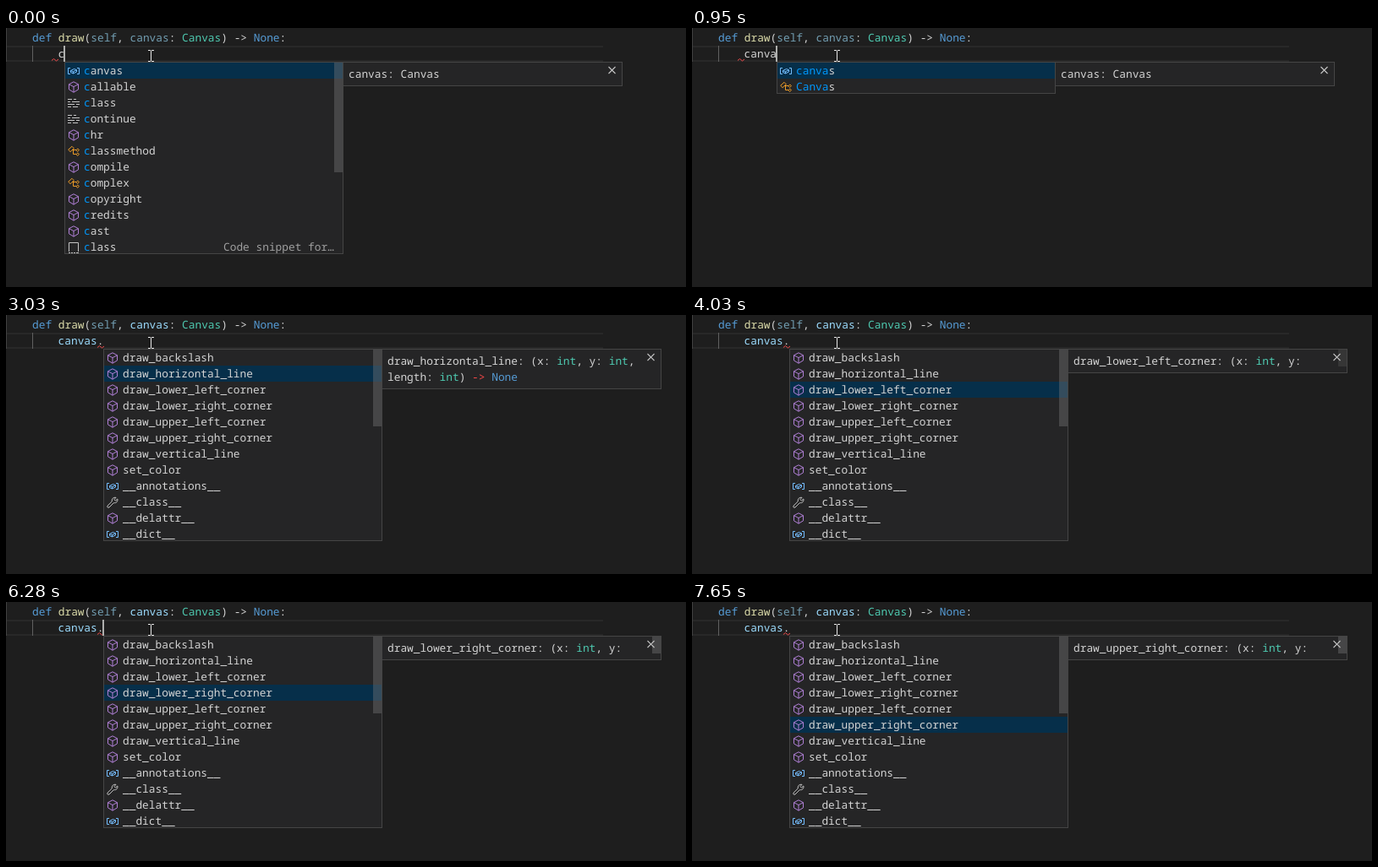
An HTML page for the animation above (8000 ms loop, 804 by 307 pixels).

```html
<!DOCTYPE html>
<html lang="en">
<head>
<meta charset="utf-8">
<title>Code completion</title>
<style>
  html, body { margin: 0; width: 100%; height: 100%; overflow: hidden; background: #1e1e1e; }
  svg { display: block; }
  text { font: 12.83px "Noto Sans Mono", monospace; fill: #d4d4d4; white-space: pre; text-rendering: geometricPrecision; }
</style>
</head>
<body>
<svg id="stage" width="804" height="307" viewBox="0 0 804 307"></svg>
<script>
const LOOP = 8000, CHAR = 7.697, ROW = 19, TOP = 40, WIDTH = 330;
const BLUE = '#569cd6', TEAL = '#4ec9b0', VAR = '#9cdcfe', DIM = '#729eb2';

// Icons on a 16 unit grid: [colour, path]
const ICONS = {
  v: ['#75beff', 'M4 4.5H1.5v7H4M12 4.5h2.5v7H12M4.5 7.6L8.5 5.5l3 1.2V9l-4 1.9-3-1.3zM4.5 7.6l3 1.1 4-2M7.5 8.7v2.2'],
  m: ['#b180d7', 'M8 1.8l5.5 2.9v6.2L8 14.2l-5.5-3.3V4.7zM2.5 4.7L8 7.6l5.5-2.9M8 7.6v6.6'],
  c: ['#ee9d28', 'M1.7 6.3l4.3-4 2.4 2.4-4.3 4zM6.5 6.5H11M7.5 6.5v5H11M11 6.8l1.8-1.8 1.7 1.6-1.8 1.8zM11 11.8l1.8-1.8 1.7 1.6-1.8 1.8z'],
  k: ['#c5c5c5', 'M1 3.5h5M8 3.5h3M1 6.5h3M6 6.5h9M1 9.5h8M11 9.5h4M1 12.5h4M7 12.5h6'],
  s: ['#c5c5c5', 'M2.5 13V2.5h11V13M2 14.5h2M5 14.5h2M8 14.5h2M11 14.5h3'],
  p: ['#c5c5c5', 'M2 12.2L7.3 7C6.7 4 9 1.7 12 2.4L9.9 4.5l1.6 1.7L13.8 4c.8 3-1.6 5.3-4.5 4.7L4 14c-1.4.9-2.9-.5-2-1.8z'],
};

// Each entry is an icon key followed by a label
const list = s => s.split(' ').map(w => [w[0], w.slice(1)]);
const pair = list('vcanvas cCanvas');
const LISTS = {
  1: list('vcanvas mcallable kclass kcontinue mchr cclassmethod mcompile ccomplex mcopyright mcredits mcast sclass'),
  2: list('vcanvas mcallable mcast cCanvas cCancelledError cChainMap cContextManager'),
  3: list('vcanvas cCanvas cCancelledError cChainMap cContextManager'),
  5: pair, 6: pair,
  7: list('mdraw_backslash mdraw_horizontal_line mdraw_lower_left_corner mdraw_lower_right_corner ' +
    'mdraw_upper_left_corner mdraw_upper_right_corner mdraw_vertical_line mset_color ' +
    'v__annotations__ p__class__ m__delattr__ v__dict__'),
};

const TYPED = [[0, 1], [290, 2], [570, 3], [950, 5], [1200, 6], [1350, 7]];
const BAR = [[0, 0], [1490, 1], [2390, 0], [4030, .5], [4150, 1], [5050, 0], [5670, .5], [5790, 1]];
const MOVES = [3030, 4030, 5670, 6660, 7160];
const BLINKS = [1900, 2390, 2780, 3280, 3780, 4270, 4790, 5290, 5790, 6280, 6780, 7280, 7650];

const valueAt = (steps, t) => steps.filter(s => s[0] <= t).pop()[1];
const passed = (times, t) => times.filter(s => s <= t).length;

const rect = (x, y, w, h, fill, extra = '') =>
  `<rect x="${x}" y="${y}" width="${w}" height="${h}" fill="${fill}" ${extra}/>`;
const box = (x, y, w, h) => rect(x + .5, y + .5, w - 1, h - 1, '#252526', 'stroke="#454545"');
const line = (d, color, extra = '') => `<path d="${d}" fill="none" stroke="${color}" ${extra}/>`;
const span = (s, color) => `<tspan fill="${color}">${s}</tspan>`;
const text = (x, y, s, extra = '') => `<text x="${x}" y="${y}" ${extra}>${s}</text>`;

// Colours the letters of a label that match the typed prefix, in order
function highlight(label, prefix) {
  let i = 0;
  return [...label].map(ch =>
    i < prefix.length && ch.toLowerCase() === prefix[i] ? (i++, span(ch, '#0097fb')) : ch).join('');
}

function signature(name, sel) {
  if (sel === 0) return [name + ': (x: int, y: int) ->'];
  if (sel === 1) return [name + ': (x: int, y: int,', 'length: int) -> None'];
  return [name + ': (x: int, y:'];
}

function editor({ typed, checked, caret }, x) {
  const word = 'canvas.'.slice(0, typed);
  const wave = checked ? 108 : 54;
  return line('M0 22H706M0 39H706', '#282828', 'stroke-width="2"') +
    rect(0, 0, 1, 40, '#404040') + rect(31, 21, 1, 19, '#606060') +
    text(4 * CHAR + .2, 16, span('def', BLUE) + ' ' + span('draw', '#dcdcaa') + '(' + span('self', DIM) + ', ' +
      span('canvas', checked ? VAR : DIM) + ': ' + span('Canvas', TEAL) + ') -> ' + span('None', BLUE) + ':') +
    text(8 * CHAR, 35, typed < 7 ? word : span('canvas', VAR) + '.') +
    line(`M${wave} 38.5l2.5-2 3 2.5 2.5-2`, '#f14c4c') +
    (caret ? rect(x - 1, 21, 2, 19, '#aeafad') : '');
}

function suggestions({ items, prefix, sel }, x) {
  const h = items.length * ROW;
  let out = box(x, TOP, WIDTH, h) + rect(x + 1, TOP + 1 + sel * ROW, WIDTH - 2, ROW, '#062f4a');
  items.forEach(([icon, label], i) => {
    const y = TOP + 1 + i * ROW, [color, d] = ICONS[icon];
    out += line(d, color, `transform="translate(${x + 3} ${y + 2})"`) +
      text(x + 23, y + 14, highlight(label, prefix));
    if (icon === 's') out += text(x + 188, y + 14, 'Code snippet for…', 'opacity=".7"');
  });
  if (items.length > 11) out += rect(x + WIDTH - 11, TOP + 1, 10, prefix ? 130 : 91, '#797979', 'opacity=".4"');
  return `<g clip-path="url(#clip)">${out}</g>` + rect(x, TOP + h - 1, WIDTH, 1, '#454545');
}

function details({ items, sel, bar, ready }, x) {
  const lines = ready ? signature(items[sel][1], sel) : ['canvas: Canvas'];
  const paint = s => s.replace(/\bint\b|None|->/g, m => span(m, { int: TEAL, None: BLUE, '->': '#f44747' }[m]));
  return box(x - 1, TOP, WIDTH + 1, 10 + lines.length * ROW) +
    lines.map((s, i) => text(x + 6, 59 + i * ROW, paint(s))).join('') +
    rect(x + WIDTH - 11, TOP + 1, 10, 20, '#797979', `opacity="${bar * .4}"`) +
    line(`M${x + 313.5} 46l8 8m0-8l-8 8`, '#c5c5c5', 'stroke-width="1.1"');
}

function stateAt(t) {
  const typed = valueAt(TYPED, t), ready = t >= 1490;
  return {
    typed, ready,
    items: typed === 7 && !ready ? pair : LISTS[typed],
    prefix: ready ? '' : 'canvas'.slice(0, typed),
    sel: passed(MOVES, t),
    bar: valueAt(BAR, t),
    checked: t >= 1780,
    caret: passed(BLINKS, t) % 2 === 0,
  };
}

const stage = document.getElementById('stage');
const clip = `<clipPath id="clip">${rect(0, 0, 804, 268, '#000')}</clipPath>`;
const pointer = line('M168 26.5h3m1 0h3M171.5 27v12M168 39.5h3m1 0h3', '#e8e8e8');
let shown = '';

function frame() {
  const s = stateAt(performance.now() % LOOP), key = JSON.stringify(s);
  if (key !== shown) {
    const x = Math.round((8 + s.typed) * CHAR);
    stage.innerHTML = clip + editor(s, x) + suggestions(s, x) + details(s, x + WIDTH) + pointer;
    shown = key;
  }
  requestAnimationFrame(frame);
}
frame();
</script>
</body>
</html>
```
